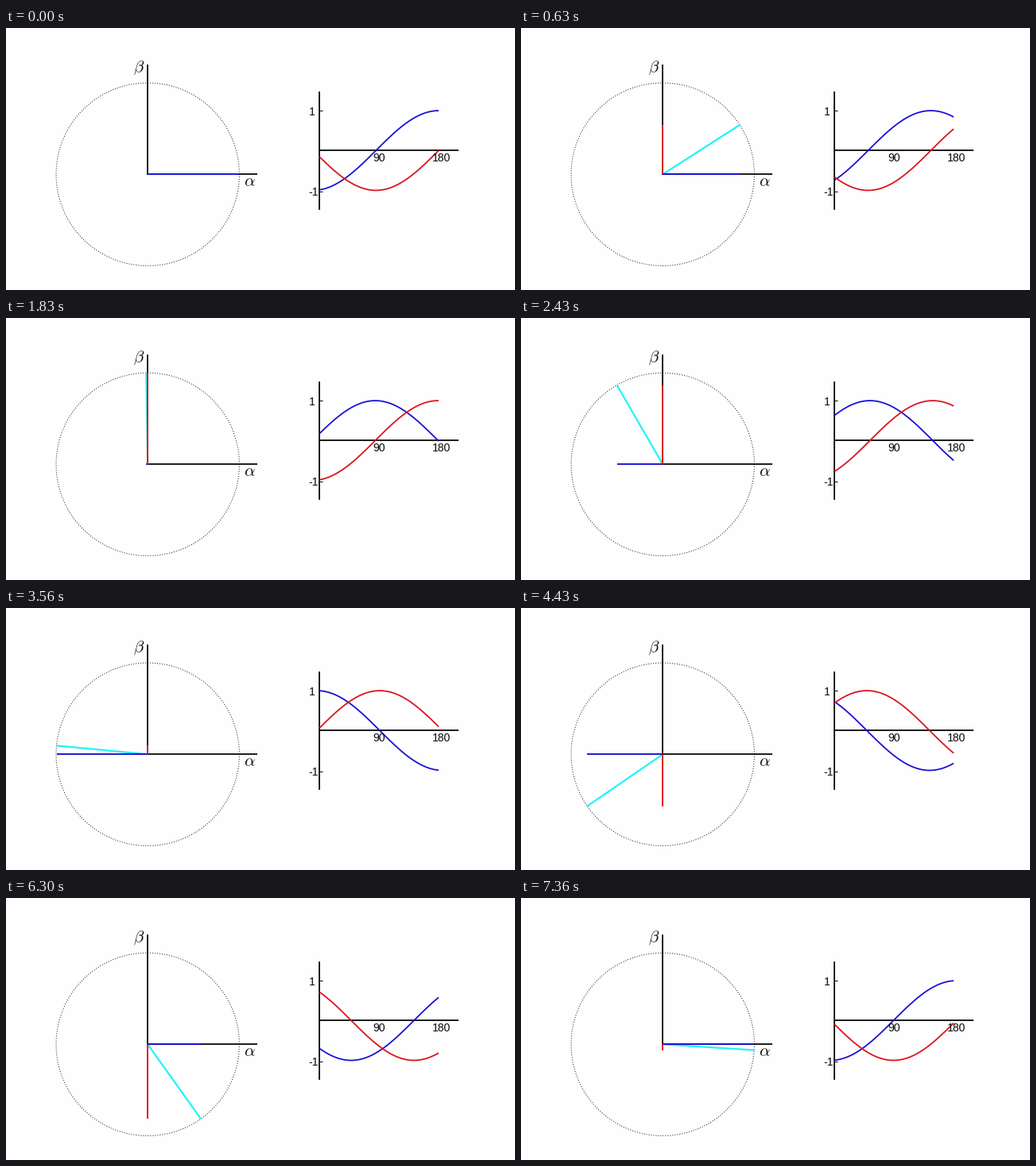
These frames come from a looping animation (640x330 px, 7.43 s). A matplotlib script:

```python
import numpy as np
import matplotlib
import matplotlib.pyplot as plt
from matplotlib.animation import FuncAnimation

matplotlib.rcParams["mathtext.fontset"] = "cm"

W, H, DPI = 640, 330, 100
LOOP, TICK = 7430, 10  # ms
STEP = 2 * np.pi / 99  # turn of the arm per sample
HISTORY = 47           # samples kept in the plot

PT = 72 / DPI
BLACK, RED, BLUE, CYAN = "#080808", "#dc1420", "#1a10d6", "#20f4f8"

CX, CY, R = 178.2, 184.3, 115.2            # circle
X0, X1, Y0, AMP = 394.2, 544, 154.3, 50.2  # plot

fig = plt.figure(figsize=(W / DPI, H / DPI), dpi=DPI, facecolor="#fefefe")
ax = fig.add_axes([0, 0, 1, 1])
ax.set_xlim(0, W)
ax.set_ylim(H, 0)
ax.axis("off")


def line(xs, ys, color=BLACK, width=1.8, **kw):
    kw.setdefault("solid_capstyle", "butt")
    return ax.plot(xs, ys, color=color, lw=width * PT, **kw)[0]


def label(x, y, text, size=14, ha="center"):
    ax.text(x, y, text, size=size * PT, ha=ha, va="baseline",
            family="Liberation Sans", color=BLACK, zorder=5)


# dotted circle with its axes
turn = np.linspace(0, 2 * np.pi, 181)
line(CX + R * np.cos(turn), CY - R * np.sin(turn), "#101820", 1,
     linestyle=(0, (1, 2)), dash_capstyle="butt")
line([CX, CX], [46, CY + 0.9])
line([CX, 316], [CY, CY])
label(160, 54.3, r"$\beta$", 21, "left")
label(298.9, 199.2, r"$\alpha$", 21, "left")

# plot axes
line([X0, X0], [80, 229])
line([X0, 568.7], [Y0, Y0])
for y in (104.3, 206.3):
    line([X0, X0 + 4], [y, y], width=1)
label(384.8, 110.3, "1")
label(387, 211, "-1")
label(469, 168, "90")
label(547.6, 168, "180")

# moving parts
arm = line([], [], CYAN, 2.2)
cos_bar = line([], [], BLUE, 1.9)
sin_bar = line([], [], RED, 1.9)
cos_curve = line([], [], BLUE, 1.8)
sin_curve = line([], [], RED, 1.8)
past = np.arange(-HISTORY, 1)
xs = np.linspace(X0, X1, HISTORY + 1)


def update(tick):
    # 15 poses a second after a short first one, each nearly one sample on
    pose = -((2 - tick) * 3 // 20)
    sample = int(pose * 0.883 + 0.35)
    angle = sample * STEP
    tip_x, tip_y = CX + R * np.cos(angle), CY - R * np.sin(angle)
    arm.set_data([CX, tip_x], [CY, tip_y])
    cos_bar.set_data([CX, tip_x], [CY, CY])
    sin_bar.set_data([CX, CX], [CY, tip_y])
    phase = (sample + past) * STEP
    cos_curve.set_data(xs, Y0 - AMP * np.cos(phase))
    sin_curve.set_data(xs, Y0 - AMP * np.sin(phase))
    return arm, cos_bar, sin_bar, cos_curve, sin_curve


anim = FuncAnimation(fig, update, frames=LOOP // TICK, interval=TICK,
                     repeat=True, repeat_delay=0)
plt.show()
```
